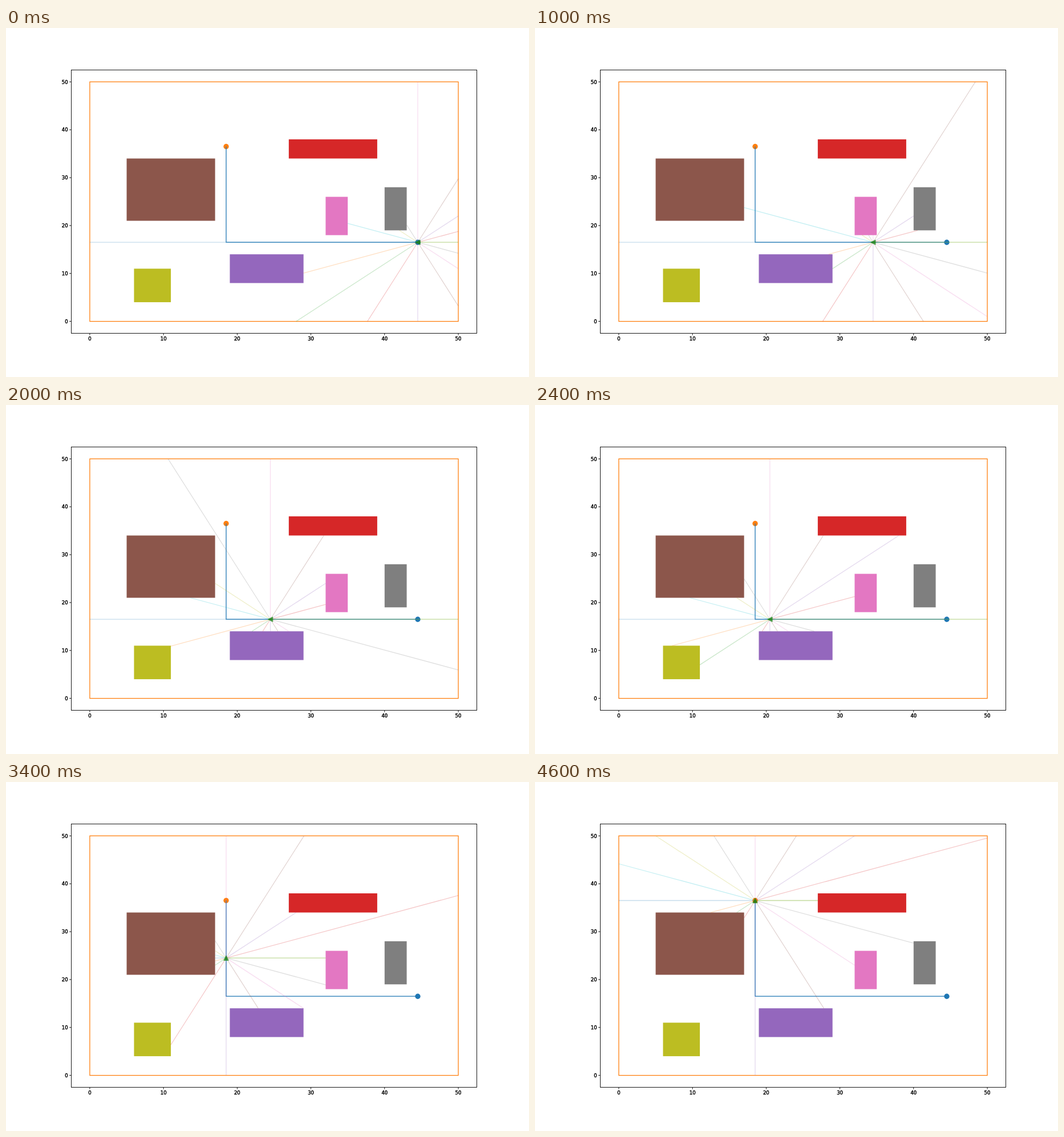
An HTML page for the animation above (4700 ms loop, 917 by 611 pixels).

```html
<!DOCTYPE html>
<html lang="en">
<head>
<meta charset="utf-8">
<title>Range sensor path</title>
<style>
  html, body { margin: 0; width: 100%; height: 100%; overflow: hidden; background: #fff; }
  svg { display: block; width: 917px; height: 611px; }
  text { font: 8.5px "DejaVu Sans", sans-serif; stroke: #000; stroke-width: .45px; }
</style>
</head>
<body>
<svg id="stage" viewBox="0 0 917 611"></svg>
<script>
const COLORS = ['#1f77b4', '#ff7f0e', '#2ca02c', '#d62728', '#9467bd',
                '#8c564b', '#e377c2', '#7f7f7f', '#bcbd22', '#17becf'];
const SIZE = 50, STEP_MS = 100, STEPS = 47, RAYS = 17, EPS = 1e-9;
const START = { x: 44.5, y: 16.5 }, GOAL = { x: 18.5, y: 36.5 };
const LINE = 1.28;

// left, right, bottom, top, colour index
const OBSTACLES = [
  [27, 39, 34, 38, 3],
  [19, 29, 8, 14, 4],
  [5, 17, 21, 34, 5],
  [32, 35, 18, 26, 6],
  [40, 43, 19, 28, 7],
  [6, 11, 4, 11, 8]
];

const px = x => 146.93 + x * 12.922;
const py = y => 513.6 - y * 8.386;
const stage = document.getElementById('stage');

function add(tag, attrs, text) {
  const el = document.createElementNS('http://www.w3.org/2000/svg', tag);
  for (const name in attrs) el.setAttribute(name, attrs[name]);
  if (text !== undefined) el.textContent = text;
  return stage.appendChild(el);
}

function dot(point, color) {
  add('circle', { cx: px(point.x), cy: py(point.y), r: 4.68, fill: color });
}

for (const [left, right, bottom, top, color] of OBSTACLES) {
  add('rect', {
    x: px(left), y: py(top), width: px(right) - px(left),
    height: py(bottom) - py(top), fill: COLORS[color]
  });
}

add('rect', {
  x: px(0), y: py(SIZE), width: px(SIZE) - px(0), height: py(0) - py(SIZE),
  fill: 'none', stroke: COLORS[1], 'stroke-width': LINE
});
dot(START, COLORS[0]);
dot(GOAL, COLORS[1]);
add('path', {
  d: `M${px(START.x)} ${py(START.y)}H${px(GOAL.x)}V${py(GOAL.y)}`,
  fill: 'none', stroke: COLORS[0], 'stroke-width': LINE
});

const rays = Array.from({ length: RAYS }, (_, i) => add('line', {
  stroke: COLORS[(i + 2) % 10], 'stroke-width': LINE, 'stroke-opacity': .25
}));
const robot = add('path', {
  d: 'M-4.25 0L4.25 -4.25V4.25Z', fill: '#008000', stroke: '#008000',
  'stroke-width': .85, 'stroke-linejoin': 'round', opacity: .7
});

add('rect', {
  x: 114.5, y: 73.5, width: 711, height: 461,
  fill: 'none', stroke: '#000', 'stroke-width': .9
});
for (let v = 0; v <= SIZE; v += 10) {
  add('path', {
    d: `M${px(v)} 534.5v3.4M114.5 ${py(v)}h-3.4`, stroke: '#000', 'stroke-width': .9
  });
  add('text', { x: px(v), y: 547, 'text-anchor': 'middle' }, v);
  add('text', { x: 108.6, y: py(v) + 3.3, 'text-anchor': 'end' }, v);
}

// Distance at which a ray enters the box, or Infinity when it misses.
function entryDistance(p, dx, dy, [left, right, bottom, top]) {
  let near = 0, far = Infinity;
  for (const [pos, dir, lo, hi] of [[p.x, dx, left, right], [p.y, dy, bottom, top]]) {
    if (Math.abs(dir) < EPS) {
      if (pos < lo || pos > hi) return Infinity;
      continue;
    }
    const a = (lo - pos) / dir, b = (hi - pos) / dir;
    near = Math.max(near, Math.min(a, b));
    far = Math.min(far, Math.max(a, b));
  }
  return near <= far + EPS ? near : Infinity;
}

function wallDistance(pos, dir) {
  return Math.abs(dir) < EPS ? Infinity : ((dir > 0 ? SIZE : 0) - pos) / dir;
}

function draw(time) {
  const step = Math.floor(time / STEP_MS) % STEPS;
  const across = START.x - GOAL.x;
  const p = {
    x: START.x - Math.min(step, across),
    y: START.y + Math.max(0, step - across)
  };
  rays.forEach((ray, i) => {
    const angle = i * 2 * Math.PI / (RAYS - 1);
    const dx = Math.cos(angle), dy = Math.sin(angle);
    const reach = Math.min(wallDistance(p.x, dx), wallDistance(p.y, dy),
      ...OBSTACLES.map(box => entryDistance(p, dx, dy, box)));
    ray.setAttribute('x1', px(p.x));
    ray.setAttribute('y1', py(p.y));
    ray.setAttribute('x2', px(p.x + dx * reach));
    ray.setAttribute('y2', py(p.y + dy * reach));
  });
  const turn = step > across ? 90 : 0;
  robot.setAttribute('transform', `translate(${px(p.x)} ${py(p.y)}) rotate(${turn})`);
}

const began = performance.now();
function tick() {
  draw(performance.now() - began);
  requestAnimationFrame(tick);
}
tick();
</script>
</body>
</html>
```
